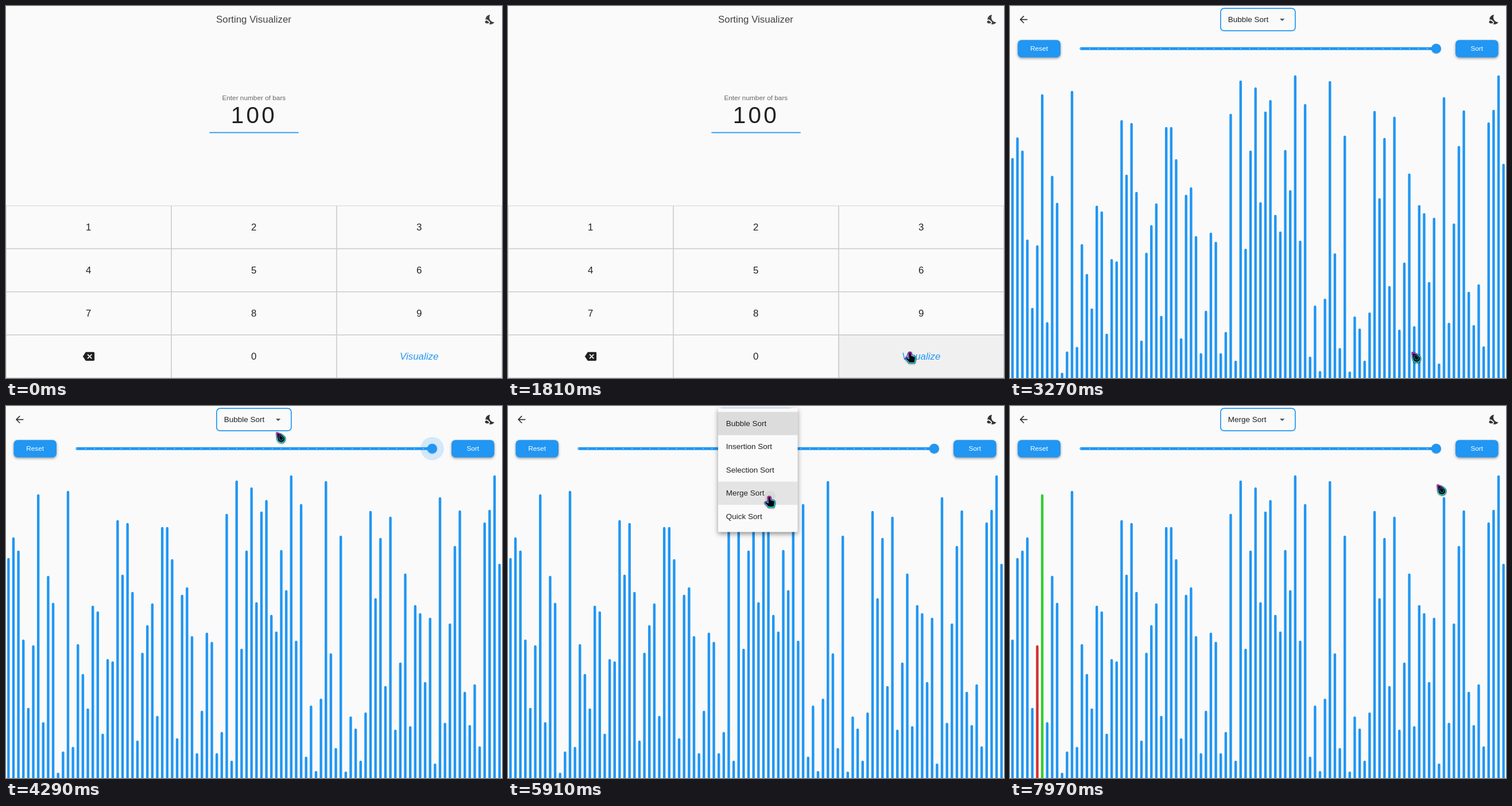
Animation of 864x648 px, one loop 8000 ms. Source, as an HTML page with a canvas:

```html
<!DOCTYPE html>
<html lang="en">
<head>
<meta charset="utf-8">
<title>Sorting Visualizer</title>
<style>
html, body { margin: 0; width: 100%; height: 100%; overflow: hidden; background: #fafafa; }
canvas { display: block; }
</style>
</head>
<body>
<canvas id="stage" width="864" height="648"></canvas>
<script>
const W = 864, H = 648, LOOP = 8000, U = 0.84375; // U: one logical pixel
const BLUE = '#2196f3', INK = '#212121', PAPER = '#fafafa';
const stage = document.getElementById('stage').getContext('2d');
const layer = document.createElement('canvas');
layer.width = W; layer.height = H;
const layerCtx = layer.getContext('2d');
let g = stage;

const tops = [
  265, 229, 252, 407, 526, 417, 154, 551, 296, 343, 639, 602, 148, 594, 415, 467, 527, 348, 358, 571,
  441, 445, 199, 294, 204, 324, 583, 430, 382, 344, 540, 211, 211, 267, 579, 329, 316, 401, 605, 531,
  395, 411, 605, 568, 188, 618, 130, 423, 252, 142, 342, 184, 164, 364, 393, 251, 321, 121, 409, 171,
  611, 522, 636, 510, 131, 431, 596, 226, 637, 541, 562, 618, 534, 183, 335, 230, 488, 193, 564, 447,
  292, 558, 347, 361, 481, 369, 623, 159, 552, 379, 244, 182, 498, 556, 485, 593, 203, 181, 121, 275];
const sorts = ['Bubble Sort', 'Insertion Sort', 'Selection Sort', 'Merge Sort', 'Quick Sort'];
const keys = ['1', '2', '3', '4', '5', '6', '7', '8', '9', '', '0', 'Visualize'];
const KEY_TOP = 347.6, KEY_W = 288, KEY_H = 75.1;
const ROW_TOP = 10.2, ROW_H = 40.5;

const icons = {
  back: new Path2D('M20 11H7.83l5.59-5.59L12 4l-8 8 8 8 1.41-1.41L7.83 13H20v-2z'),
  drop: new Path2D('M7 10l5 5 5-5z'),
  moon: new Path2D('M11.1 12.08C8.77 7.57 10.6 3.6 11.63 2.01 6.27 2.2 1.98 6.59 1.98 12c0 .14.02.28.02.42.62-.27 1.29-.42 2-.42 1.66 0 3.18.83 4.1 2.15 1.67.48 2.9 2.02 2.9 3.85 0 1.52-.87 2.83-2.12 3.51.98.32 2.03.5 3.11.5 3.5 0 6.58-1.8 8.37-4.52-2.36.23-6.98-.97-9.26-5.41zM7 16h-.18C6.4 14.84 5.3 14 4 14c-1.66 0-3 1.34-3 3s1.34 3 3 3h3c1.1 0 2-.9 2-2s-.9-2-2-2z'),
  erase: new Path2D('M22 3H7c-.69 0-1.23.35-1.59.88L0 12l5.41 8.11c.36.53.9.89 1.59.89h15c1.1 0 2-.9 2-2V5c0-1.1-.9-2-2-2zm-3 12.59L17.59 17 14 13.41 10.41 17 9 15.59 12.59 12 9 8.41 10.41 7 14 10.59 17.59 7 19 8.41 15.41 12 19 15.59z')
};
const pointers = {
  hand: new Path2D('M-2 1.8C-2-.2 2.2-.2 2.4 1.8L2.6 6 8 7.4C9.6 8 10 9 9.8 10.5L9 15.5 8 18.6H-1L-7 12C-7.8 9.6-5.6 8.6-4.2 9.8L-1.8 11.4Z'),
  arrow: new Path2D('M.8.8C5 2 15 5.500 15 11.500C15 15.200 12 17.600 8.800 17.600C5 17.600 2 15 1.800 11.500C1.600 8 .8 4 .8.8Z')
};

const clamp = v => Math.max(0, Math.min(1, v));
const part = (t, a, b) => clamp((t - a) / (b - a));
const mix = (a, b, k) => a + (b - a) * k;
const smooth = k => k * k * (3 - 2 * k);
const black = a => `rgba(0,0,0,${a})`;

function bezier(x1, y1, x2, y2) {
  const at = (p, q, s) => 3 * p * s * (1 - s) ** 2 + 3 * q * s * s * (1 - s) + s ** 3;
  return x => {
    let lo = 0, hi = 1;
    for (let i = 0; i < 24; i++) {
      const mid = (lo + hi) / 2;
      if (at(x1, x2, mid) < x) lo = mid; else hi = mid;
    }
    return at(y1, y2, lo);
  };
}
const fastOutSlowIn = bezier(0.4, 0, 0.2, 1);
const easeIn = bezier(0.42, 0, 1, 1);

// Comparisons of a merge sort, each with the bars as they stand
const steps = [];
function mergeSort(a, l, r) {
  if (l >= r) return;
  let m = (l + r) >> 1, i = l, j = m + 1;
  mergeSort(a, l, m);
  mergeSort(a, j, r);
  while (i <= m && j <= r) {
    steps.push({ i, j, bars: a.slice() });
    if (a[i] < a[j]) {
      a.splice(i, 0, a.splice(j, 1)[0]);
      m++; j++;
    }
    i++;
  }
}
mergeSort(tops.slice(), 0, tops.length - 1);

function text(s, x, y, size, color, align = 'center', style = '') {
  g.font = `${style} ${size * U}px "Liberation Sans", Arial, sans-serif`;
  g.textAlign = align;
  g.fillStyle = color;
  g.fillText(s, x, y + size * U * 0.348);
}

function icon(name, x, y, color) {
  g.save();
  g.translate(x, y);
  g.scale(U, U);
  g.translate(-12, -12);
  g.fillStyle = color;
  g.fill(icons[name]);
  g.restore();
}

function disc(x, y, r, color) {
  g.fillStyle = color;
  g.beginPath();
  g.arc(x, y, r, 0, 7);
  g.fill();
}

function roundBox(x, y, w, h, r) {
  g.beginPath();
  g.roundRect(x, y, w, h, r);
}

function shadow(blur, dy, alpha) {
  g.shadowColor = black(alpha);
  g.shadowBlur = blur;
  g.shadowOffsetY = dy;
}

function inside(x, y, w, h, draw) {
  g.save();
  g.beginPath();
  g.rect(x, y, w, h);
  g.clip();
  draw();
  g.restore();
}

// [time, x, y] of the pointer's hot spot
const path = [
  [1130, 732, 362], [1450, 680, 480], [1800, 700, 603], [3790, 700, 603],
  [4290, 471, 46], [4410, 460, 29], [4950, 460, 29], [5460, 460, 190],
  [5500, 460, 190], [5670, 455, 157], [6430, 455, 159], [6890, 834, 82.5],
  [7480, 834, 82.5], [7970, 744, 137]];

function pointerAt(t) {
  let n = 0;
  while (n < path.length - 2 && t >= path[n + 1][0]) n++;
  const [a, b] = [path[n], path[n + 1]];
  const k = smooth(part(t, a[0], b[0]));
  return { x: mix(a[1], b[1], k), y: mix(a[2], b[2], k) };
}

function isHand(t, { x, y }) {
  if (t < 2970) return true;
  if (t >= 4700 && t < 6030) return true;
  if (y < 44) return x > 366 && x < 498;
  return y > 59 && y < 90 && (x > 776 || x < 752);
}

function drawPointer(t) {
  if (t < 1130) return;
  const p = pointerAt(t);
  const shape = pointers[isHand(t, p) ? 'hand' : 'arrow'];
  const tint = g.createLinearGradient(0, 1, 7, 13);
  tint.addColorStop(0, '#e815c8');
  tint.addColorStop(0.35, '#8a5be0');
  tint.addColorStop(0.7, '#12e0e6');
  g.save();
  g.translate(p.x, p.y);
  g.lineJoin = 'round';
  g.save();
  shadow(3, 1, 0.4);
  g.strokeStyle = '#111';
  g.lineWidth = 2.6;
  g.stroke(shape);
  g.restore();
  g.strokeStyle = tint;
  g.lineWidth = 1.6;
  g.fillStyle = '#050508';
  g.fill(shape);
  g.stroke(shape);
  if (shape === pointers.arrow) {
    g.translate(4, 4.6);
    g.scale(0.52, 0.52);
    g.lineWidth = 1.6;
    g.stroke(shape);
  }
  g.restore();
}

function drawEntry(t) {
  g.fillStyle = PAPER;
  g.fillRect(0, 0, W, H);
  text('Sorting Visualizer', 431.5, 23.6, 20, '#424242');
  icon('moon', 843.75, 23.6, '#424242');
  text('Enter number of bars', 431.8, 160.2, 14, '#666');
  [...'100'].forEach((d, i) => text(d, 403.1 + 26.7 * i, 190.4, 48, INK));
  g.fillStyle = BLUE;
  g.fillRect(354.4, 219.6, 155.3, 1.8);

  const p = pointerAt(t);
  const over = t < 1130 ? -1 : Math.floor((p.y - KEY_TOP) / KEY_H) * 3 + Math.floor(p.x / KEY_W);
  keys.forEach((label, i) => {
    const x = i % 3 * KEY_W, y = KEY_TOP + Math.floor(i / 3) * KEY_H;
    const cx = x + KEY_W / 2, cy = y + KEY_H / 2;
    if (i === over) {
      g.fillStyle = black(0.04);
      g.fillRect(x, y, KEY_W, KEY_H);
      if (t > 2740) inside(x, y, KEY_W, KEY_H, () => {
        const fade = 1 - part(t, 2950, 3130);
        g.fillStyle = black(0.06 * part(t, 2740, 2860) * fade);
        g.fillRect(x, y, KEY_W, KEY_H);
        disc(p.x, p.y, mix(8, 170, part(t, 2740, 3060)), black(0.06 * fade));
      });
    }
    g.strokeStyle = black(0.18);
    g.lineWidth = U;
    g.strokeRect(x + U / 2, y + U / 2, KEY_W - U, KEY_H - U);
    if (!label) icon('erase', cx, cy, INK);
    else if (i === 11) text(label, cx - 0.3, cy, 20, BLUE, 'center', 'italic');
    else text(label, cx - 0.4, cy, 20, INK);
  });
}

function drawButton(label, x) {
  g.save();
  shadow(4, 1.8, 0.4);
  g.fillStyle = BLUE;
  roundBox(x, 59.2, 74.6, 30.2, 6.75);
  g.fill();
  g.restore();
  text(label, x + 37.2, 74.3, 14, '#fff');
}

function drawSlider(t) {
  const left = 123.3, right = 742.4, y = 74.2;
  g.fillStyle = BLUE;
  roundBox(left - 1.9, y - 2.5, right - left, 5, 2.5);
  g.fill();
  for (let i = 0; i <= 40; i++) disc(mix(left, right, i / 40), y, 0.85, 'rgba(255,255,255,.6)');
  const halo = part(t, 4170, 4250) * (1 - part(t, 4330, 4410));
  if (halo > 0) disc(right, y, 20.25 * halo, 'rgba(33,150,243,.18)');
  g.save();
  shadow(2, 0.8, 0.25);
  disc(right, y, 8.5, BLUE);
  g.restore();
}

function drawBars(t) {
  const n = Math.floor((t - 7380) / 84);
  const step = n >= 0 ? steps[n] : { bars: tops };
  step.bars.forEach((top, k) => {
    g.fillStyle = k === step.i ? '#d32f2f' : k === step.j ? '#32cd32' : BLUE;
    roundBox((k + 0.5) * 8.64 - 2.2, top - 0.3, 4.4, H - top + 20, [2.2, 2.2, 0, 0]);
    g.fill();
  });
}

function drawMenu(t) {
  if (t < 4700 || t >= 6030) return;
  const k = (t - 4700) / 300;
  const x = 366, w = 138.6, y = ROW_TOP - 6.75;
  const h = mix(ROW_H, ROW_H * 5 + 13.5, fastOutSlowIn(part(k, 0.25, 0.5)));
  const p = pointerAt(t);
  const over = Math.floor((p.y - ROW_TOP) / ROW_H);
  g.save();
  g.globalAlpha = part(k, 0, 0.25);
  g.save();
  shadow(9, 3.5, 0.42);
  g.fillStyle = PAPER;
  roundBox(x, y, w, h, 1.7);
  g.fill();
  g.restore();
  inside(x, y, w, h, () => sorts.forEach((name, i) => {
    const top = ROW_TOP + i * ROW_H, from = 0.5 + (i + 1) * 0.5 / 6.5;
    g.globalAlpha = i ? part(k, from, from + 0.75 / 6.5) : part(k, 0, 0.25);
    const shade = (i ? 0 : 0.12) + (i && i === over ? 0.04 : 0);
    g.fillStyle = black(shade);
    g.fillRect(x, top, w, ROW_H);
    if (i === 3 && t >= 5840) {
      g.fillStyle = black(0.05 * part(t, 5840, 5900));
      g.fillRect(x, top, w, ROW_H);
      disc(p.x + 1, p.y, 10 * part(t, 5800, 5910), black(0.045));
    }
    text(name, 379.7, top + ROW_H / 2 - 0.3, 16, INK, 'left');
  }));
  g.restore();
}

function drawSorter(t) {
  g.fillStyle = PAPER;
  g.fillRect(0, 0, W, H);
  drawBars(t);
  icon('back', 23.6, 23.6, '#333');
  icon('moon', 843.75, 23.6, '#333');
  g.strokeStyle = BLUE;
  g.lineWidth = 1.7;
  roundBox(366.9, 4.2, 130, 39, 6);
  g.stroke();
  text(sorts[t < 6030 ? 0 : 3], 379.7, 23.4, 16, INK, 'left');
  icon('drop', 474.2, 23.6, '#5a5a5a');
  drawButton('Reset', 13.4);
  drawButton('Sort', 776);
  if (t > 7300 && t < 7640) {
    g.save();
    roundBox(776, 59.2, 74.6, 30.2, 6.75);
    g.clip();
    const fade = 1 - part(t, 7430, 7640);
    disc(834, 82.5, mix(6, 66, part(t, 7300, 7560)), `rgba(255,255,255,${0.24 * fade})`);
    g.restore();
  }
  drawSlider(t);
  drawMenu(t);
}

function draw(t) {
  const k = part(t, 2945, 3245);
  g = stage;
  if (k < 1) drawEntry(t);
  if (k > 0) {
    g = layerCtx;
    drawSorter(t);
    g = stage;
    g.globalAlpha = easeIn(k);
    g.drawImage(layer, 0, k < 1 ? H / 4 * (1 - fastOutSlowIn(k)) : 0);
    g.globalAlpha = 1;
  }
  drawPointer(t);
}

const start = performance.now();
function tick() {
  draw((performance.now() - start) % LOOP);
  requestAnimationFrame(tick);
}
tick();
</script>
</body>
</html>
```
